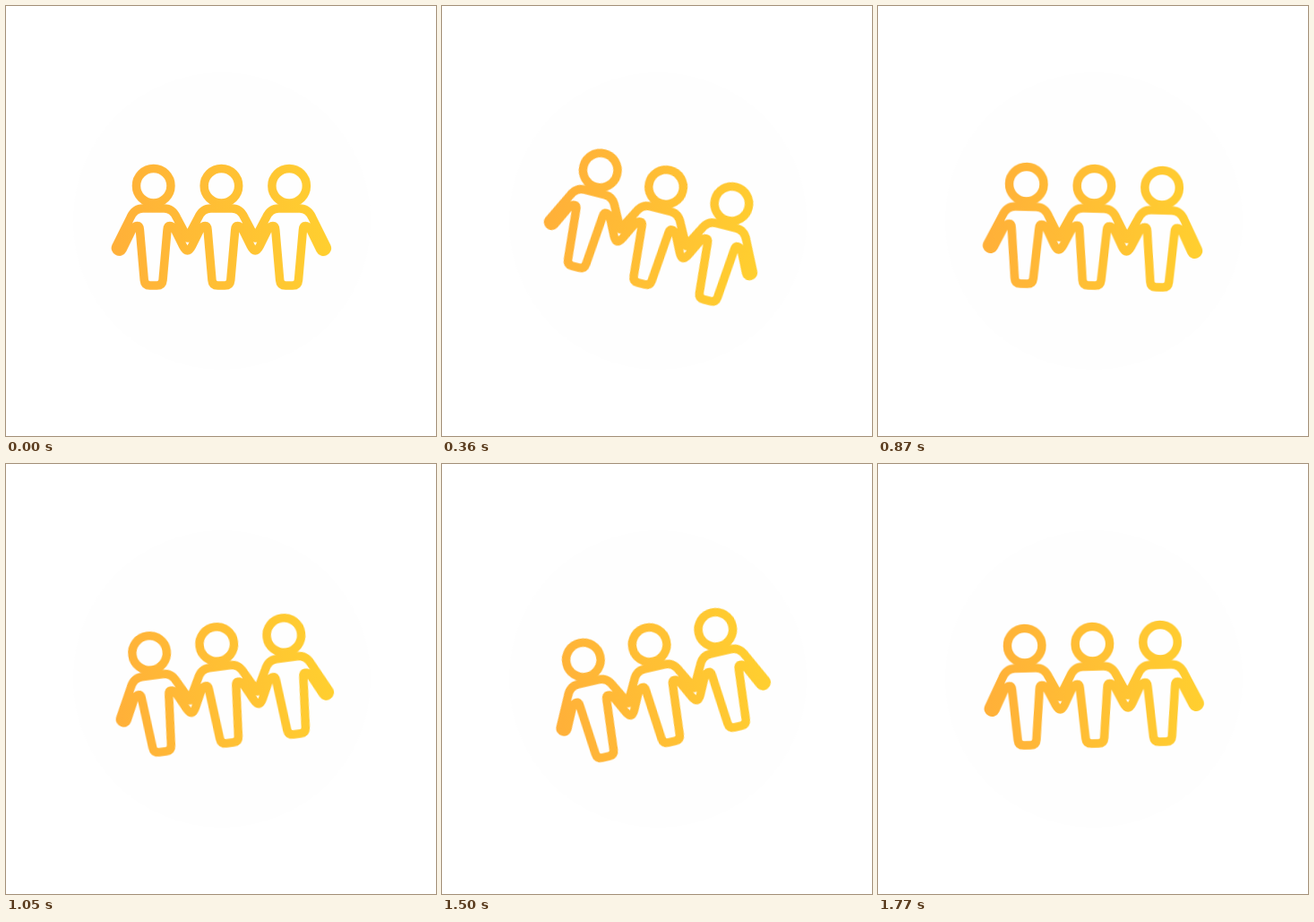
Write an HTML page without scripts that moves like this. It is 480x480 px and loops after 1800 ms.

```html
<!DOCTYPE html>
<html lang="en">
<head>
<meta charset="utf-8">
<title>Swaying group</title>
<style>
html, body { margin: 0; width: 100%; height: 100%; overflow: hidden; background: #fff; }
svg { display: block; width: 100%; height: 100%; }
.group {
  fill: none;
  stroke: url(#gold);
  stroke-width: 9.5;
  stroke-linejoin: round;
  transform-origin: 240px 240px;
  /* starts halfway through a swing, upright */
  animation: sway 900ms cubic-bezier(.3642, 0, .6358, 1) -450ms infinite alternate;
}
@keyframes sway {
  from { transform: rotate(-15deg); }
  to { transform: rotate(15deg); }
}
</style>
</head>
<body>
<svg viewBox="0 0 480 480">
  <defs>
    <linearGradient id="gold" gradientUnits="userSpaceOnUse" x1="118" y1="0" x2="362" y2="0">
      <stop offset="0" stop-color="#ffb039"/>
      <stop offset="1" stop-color="#ffcf2f"/>
    </linearGradient>
  </defs>
  <circle cx="241" cy="240" r="166" fill="#fefefe"/>
  <g class="group">
    <circle cx="164.7" cy="200.7" r="19.25"/>
    <circle cx="240.4" cy="200.7" r="19.25"/>
    <circle cx="316.1" cy="200.7" r="19.25"/>
    <!-- shoulders left to right, then legs right to left -->
    <path d="M122.8 268.5L139 236
      q4.5-10 14-10h23.4q9.5 0 14 10l12.15 23l12.15-23
      q4.5-10 14-10h23.4q9.5 0 14 10l12.15 23l12.15-23
      q4.5-10 14-10h23.4q9.5 0 14 10l16.2 32.5
      a4 4 0 0 1-7.2 3.5l-10.5-21.5
      q-2.5-5-6-5q-2.6 0-2.9 4.5l-4.9 56q-.5 6-6.5 6h-7.8q-6 0-6.5-6l-4.9-56q-.3-4.5-2.9-4.5q-3.5 0-6 5
      l-8.65 17.5q-5 10-10 0l-8.65-17.5
      q-2.5-5-6-5q-2.6 0-2.9 4.5l-4.9 56q-.5 6-6.5 6h-7.8q-6 0-6.5-6l-4.9-56q-.3-4.5-2.9-4.5q-3.5 0-6 5
      l-8.65 17.5q-5 10-10 0l-8.65-17.5
      q-2.5-5-6-5q-2.6 0-2.9 4.5l-4.9 56q-.5 6-6.5 6h-7.8q-6 0-6.5-6l-4.9-56q-.3-4.5-2.9-4.5q-3.5 0-6 5
      l-10.5 21.5a4 4 0 0 1-7.2-3.5z"/>
  </g>
</svg>
</body>
</html>
```
